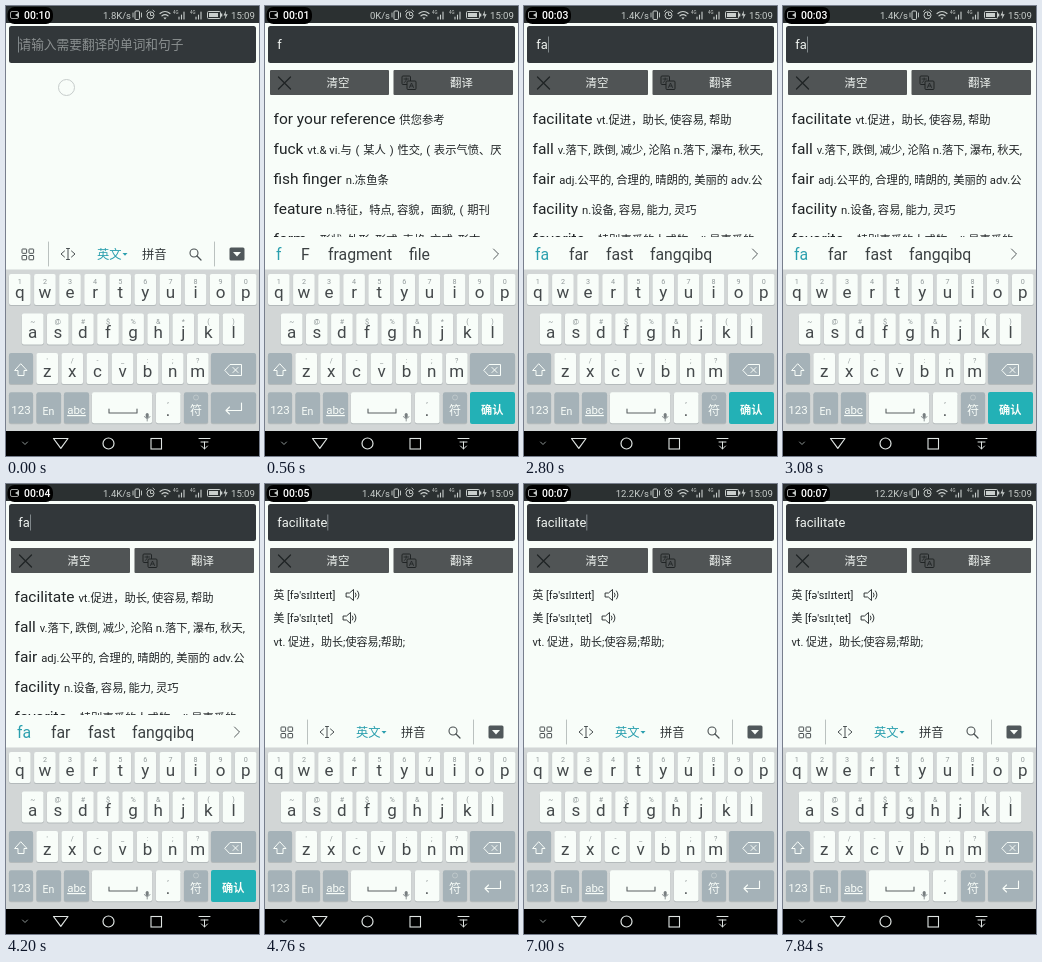
Write an HTML page that moves like this. It is 253 px wide and 450 px high and loops after 8 s.

```html
<!DOCTYPE html>
<html lang="zh-CN">
<head>
<meta charset="utf-8">
<title>Dictionary lookup</title>
<style>
html, body { margin: 0; width: 100%; height: 100%; overflow: hidden; background: #f8fdf9; }
svg { display: block; width: 100vw; height: 100vh; }
text { font-family: Roboto, "Noto Sans CJK SC", "Noto Sans CJK", "Noto Sans", sans-serif; white-space: pre; }
.line { fill: none; stroke-linecap: round; stroke-linejoin: round; }
</style>
</head>
<body>
<svg id="stage" viewBox="0 0 253 450" xmlns="http://www.w3.org/2000/svg"></svg>
<script>
const LOOP = 8000, STEP = 280;
const WHITE = '#f8fdf9', INK = '#202426', GREY_KEY = '#a5b2b8', TEAL = '#2a9fae';

const label = (x, y, size, fill, content, extra = '') =>
  `<text x="${x}" y="${y}" font-size="${size}" fill="${fill}" ${extra}>${content}</text>`;
const centred = (x, y, size, fill, content, extra = '') =>
  label(x, y, size, fill, content, 'text-anchor="middle" ' + extra);
const box = (x, y, w, h, fill, r = 0, extra = '') =>
  `<rect x="${x}" y="${y}" width="${w}" height="${h}" rx="${r}" fill="${fill}" ${extra}/>`;
const line = (d, stroke, width = 1) =>
  `<path class="line" d="${d}" stroke="${stroke}" stroke-width="${width}"/>`;
const solid = (d, fill) => `<path d="${d}" fill="${fill}"/>`;
const ring = (x, y, r, stroke, width = 1) =>
  `<circle cx="${x}" cy="${y}" r="${r}" fill="none" stroke="${stroke}" stroke-width="${width}"/>`;
const group = (id, content) => `<g id="${id}">${content}</g>`;
const key = (x, y, w, fill) =>
  box(x - .2, y + .9, w + .4, 31, '#b4babb', 2) + box(x, y, w, 31, fill, 2);
const escapeText = s => s.replace(/&/g, '&amp;');

function statusBar() {
  const c = '#c9cecc';
  const signal = x => label(x, 8, 4.5, c, '4G') +
    line(`M${x + 6} 13v-2M${x + 8.5} 13v-4M${x + 11} 13v-7`, c, 1.1);
  return box(0, 0, 253, 17, '#2b3031') + box(1.5, 1, 45.5, 17, '#000', 7) +
    box(4.5, 5.5, 8, 7, 'none', 1.5, 'stroke="#c4c8c6" stroke-width=".8"') + solid('M9 9l4-2.5v5Z', '#c4c8c6') +
    label(18, 13, 10.4, '#fff', '', 'id="timer" font-weight="500"') +
    label(125, 12.5, 9.5, c, '', 'id="speed" text-anchor="end"') +
    box(129, 5, 4.5, 8.5, 'none', 1, `stroke="${c}"`) + line('M127 7v4M135.5 7v4', c, .9) +
    ring(144.5, 9.3, 3.5, c) + line('M144.5 7v2.5h2M140.5 5.5l1.5-1.3M148.5 5.5l-1.5-1.3', c, .9) +
    line('M154 7.5q5-4 10 0M156 9.8q3-2.4 6 0', c, 1.2) + solid('M157.3 11.5h3.4L159 13.5Z', c) +
    signal(167) + signal(184) +
    box(201.5, 5.5, 13, 7, 'none', 1, `stroke="${c}"`) + box(203, 7, 9, 4, c) + box(215, 7.5, 1.3, 3, c) +
    solid('M220 4.5l-2.5 5h2l-.8 4 3-5.3h-2Z', c) +
    label(225, 12.5, 9.6, c, '15:09');
}

function actionButtons() {
  const dark = '#202425', caption = '#eef2ef', weight = 'font-weight="500"';
  return box(5, 64, 119, 25, '#505455', 1) + box(128.5, 64, 119.5, 25, '#505455', 1) +
    line('M13.5 71l12 12M25.5 71l-12 12', dark, 1.3) +
    centred(73, 81, 11.4, caption, '清空', weight) + centred(196.5, 81, 11.4, caption, '翻译', weight) +
    box(137, 70, 8.5, 8.5, 'none', 1, `stroke="${dark}"`) +
    box(142, 75, 9, 8.5, '#505455', 1, `stroke="${dark}"`) +
    line('M139 73h4.5M141.2 72v1c0 2-1 3-2 3.5M144.5 81.5l2-4.5 2 4.5M145.2 80h2.6', dark, .8);
}

function entryList(entries) {
  return '<g clip-path="url(#listArea)">' + entries.map(([word, meaning], i) =>
    label(8.5, 117.5 + 30 * i, 15.5, INK,
      `${word} <tspan font-size="11.3">${escapeText(meaning)}</tspan>`)).join('') + '</g>';
}

function candidates(words) {
  return words.map(([x, word], i) => label(x, 254, 15.8, i ? '#3b4042' : TEAL, word)).join('') +
    line('M228.5 243l5 5-5 5', '#555b5d');
}

function resultPage() {
  const speaker = (x, y) =>
    line(`M${x} ${y - 2}h3l4-3.5v11l-4-3.5h-3Z`, INK, .9) +
    line(`M${x + 9} ${y - 2}q1.5 2 0 4M${x + 11} ${y - 4}q3 4 0 8`, INK, .9);
  return label(8.5, 115, 10.8, INK, "英 [fə'sɪlɪteɪt]") + speaker(81.5, 111) +
    label(8.5, 138, 10.8, INK, "美 [fə'sɪlɪˌtet]") + speaker(78.5, 134) +
    label(8.5, 162, 11, INK, 'vt. 促进，助长;使容易;帮助;');
}

function toolbar() {
  const c = '#4a5052';
  const squares = [[16, 243], [23, 243], [16, 249.5], [23, 249.5]]
    .map(([x, y]) => box(x, y, 4.6, 4.3, 'none', .5, `stroke="${c}"`)).join('');
  return squares + line('M42.5 236v24M208.5 236v24', '#aab1b0', .8) +
    line('M58.5 245l-3.5 3 3.5 3M65.5 245l3.5 3-3.5 3M60.5 242.5h3M62 242.5v11M60.5 253.5h3', c) +
    label(91, 252.5, 12.3, TEAL, '英文') + solid('M116.5 247h5l-2.5 2.8Z', TEAL) +
    label(136, 252.5, 12.3, '#33383a', '拼音') +
    ring(188, 247, 4, c, 1.1) + line('M191 250l4 4', c, 1.2) +
    box(223.5, 241.5, 15, 13, '#50585b', 1.5) + solid('M227 246h8l-4 4.5Z', WHITE);
}

function keyboard() {
  const row = (letters, hints, firstX, y) => [...letters].map((letter, i) => {
    const x = firstX + 25.1 * i;
    return key(x - 10.8, y, 21.6, WHITE) + centred(x, y + 24.4, 17, '#44494b', letter) +
      centred(x, y + 10, 7.2, '#929a9b', escapeText(hints[i]));
  }).join('');
  return box(0, 263.5, 253, 161.5, '#d2d6d6') +
    row('qwertyuiop', '1234567890', 13.8, 268) +
    row('asdfghjkl', '~@#$%&*()', 26.7, 307.5) +
    row('zxcvbnm', "'/-_:;?", 41.2, 347) +
    key(3, 347, 24, GREY_KEY) + key(205, 347, 45, GREY_KEY) +
    key(3, 386.3, 24, GREY_KEY) + key(30.5, 386.3, 24.5, GREY_KEY) + key(58, 386.3, 25, GREY_KEY) +
    key(86, 386.3, 60, WHITE) + key(150, 386.3, 24.5, WHITE) + key(178, 386.3, 24, GREY_KEY) +
    line('M15 358l6 6.5h-3v5h-6v-5h-3Z', WHITE) +
    line('M219 364l5-5.5h11.5v11H224ZM227 361.5l5 5M232 361.5l-5 5', WHITE) +
    centred(15, 408, 11.5, WHITE, '123') + centred(42.5, 408.5, 10.5, WHITE, 'En') +
    centred(70.5, 408, 11.5, WHITE, 'abc', 'text-decoration="underline"') +
    line('M103 403v4h28v-4', '#5a6062', 1.1) +
    box(139.7, 407, 3, 5, '#777e80', 1.5) + line('M138.4 410.5q2.8 4.5 5.6 0M141.2 413v2', '#777e80', .8) +
    centred(162, 397, 8, '#7d8486', ',') + centred(162, 410, 17, '#44494b', '.') +
    centred(190, 408.5, 12, WHITE, '符') + ring(190, 391.5, 2.5, '#c7d0d2', .7);
}

function navBar() {
  const c = '#dfe4e2';
  return box(0, 425, 253, 25, '#000') +
    line('M16.5 436l2.5 2.5 2.5-2.5', '#8d9594') +
    line('M47.5 432.5h14.5l-7.2 9.8Z', c, 1.2) + ring(102.5, 437.5, 5.5, c, 1.2) +
    box(145, 432.5, 10.5, 10.5, 'none', 0, `stroke="${c}" stroke-width="1.1"`) +
    line('M193 432.5h11M195 436h7M198.5 436v7M195.5 440l3 3 3-3', c);
}

// Brackets sit in the middle of a full-width cell.
const OPEN = '\u2004(\u2004', CLOSE = '\u2004)\u2004';
const listF = [
  ['for your reference', '供您参考'],
  ['fuck', `vt.& vi.与${OPEN}某人${CLOSE}性交,${OPEN}表示气愤、厌`],
  ['fish finger', 'n.冻鱼条'],
  ['feature', `n.特征，特点, 容貌，面貌,${OPEN}期刊`],
  ['form', 'n.形状, 外形, 形式, 表格, 方式, 形态']
];
const listFa = [
  ['facilitate', 'vt.促进，助长, 使容易, 帮助'],
  ['fall', 'v.落下, 跌倒, 减少, 沦陷 n.落下, 瀑布, 秋天,'],
  ['fair', 'adj.公平的, 合理的, 晴朗的, 美丽的 adv.公'],
  ['facility', 'n.设备, 容易, 能力, 灵巧'],
  ['favorite', 'n.特别喜爱的人或物 adj.最喜爱的']
];

const stage = document.getElementById('stage');
stage.innerHTML =
  '<defs><clipPath id="listArea"><rect x="0" y="92" width="253" height="139"/></clipPath></defs>' +
  box(0, 0, 253, 450, WHITE) + statusBar() +
  box(3, 20, 247, 37, '#32373a', 2.5) +
  label(12.5, 43.3, 12.7, '#8b9091', '请输入需要翻译的单词和句子', 'id="hint"') +
  label(12.3, 42.5, 12.9, '#f0f4f1', '', 'id="query"') +
  box(0, 30.5, 1, 16, '#80878a', 0, 'id="caret"') +
  group('touch', ring(60.5, 81.5, 8, '#c6cccb')) +
  group('buttons', actionButtons()) +
  group('pageF', entryList(listF) + candidates([[11, 'f'], [36, 'F'], [63, 'fragment'], [144, 'file']])) +
  group('pageFa', entryList(listFa) + candidates([[11, 'fa'], [45, 'far'], [82, 'fast'], [126, 'fangqibq']])) +
  group('result', resultPage()) + group('tools', toolbar()) + keyboard() +
  group('enter', key(205, 386.3, 45, GREY_KEY) +
    line('M235.5 397v7.5H220M223.5 401l-3.5 3.5 3.5 3.5', WHITE, 1.1)) +
  group('confirm', box(205, 386, 45, 32, '#23b1b6', 2) +
    centred(227.3, 407.8, 11.2, WHITE, '确认', 'font-weight="700"')) +
  navBar();

const part = Object.fromEntries([...stage.querySelectorAll('[id]')].map(el => [el.id, el]));
const show = (id, visible) => part[id].setAttribute('display', visible ? 'inline' : 'none');
const setText = (id, value) => {
  if (part[id].textContent !== value) part[id].textContent = value;
};

// Each track lists [start time, value]; a value holds until the next start.
const at = (track, t) => track.filter(([start]) => start <= t).pop()[1];
const queries = [[0, ''], [560, 'f'], [2520, 'fa'], [4760, 'facilitate']];
const speeds = [[0, '1.8K/s'], [280, '0K/s'], [2520, '1.4K/s'], [5600, '12.2K/s']];
const caretOn = [[0, 560], [840, 1680], [2240, 3360], [4200, 5040], [5600, 6160], [6720, 7560]];
const caretX = { '': 12, f: 17, fa: 24, facilitate: 62.3 };

function timerText(t) {
  const seconds = t < STEP ? 10 : 1 + Math.floor((t - 560) / 1050);
  return '00:' + String(seconds).padStart(2, '0');
}

function render(time) {
  const t = Math.floor(time / STEP) * STEP;
  const query = at(queries, t);
  const listing = query === 'f' || query === 'fa';
  setText('timer', timerText(t));
  setText('speed', at(speeds, t));
  setText('query', query);
  part.caret.setAttribute('x', caretX[query]);
  show('caret', caretOn.some(([from, to]) => t >= from && t < to));
  show('touch', t < STEP);
  show('hint', !query);
  show('buttons', query);
  show('pageF', query === 'f');
  show('pageFa', query === 'fa');
  show('result', query === 'facilitate');
  show('tools', !listing);
  show('enter', !listing);
  show('confirm', listing);
}

const started = performance.now();
function tick() {
  render((performance.now() - started) % LOOP);
  requestAnimationFrame(tick);
}
tick();
</script>
</body>
</html>
```
